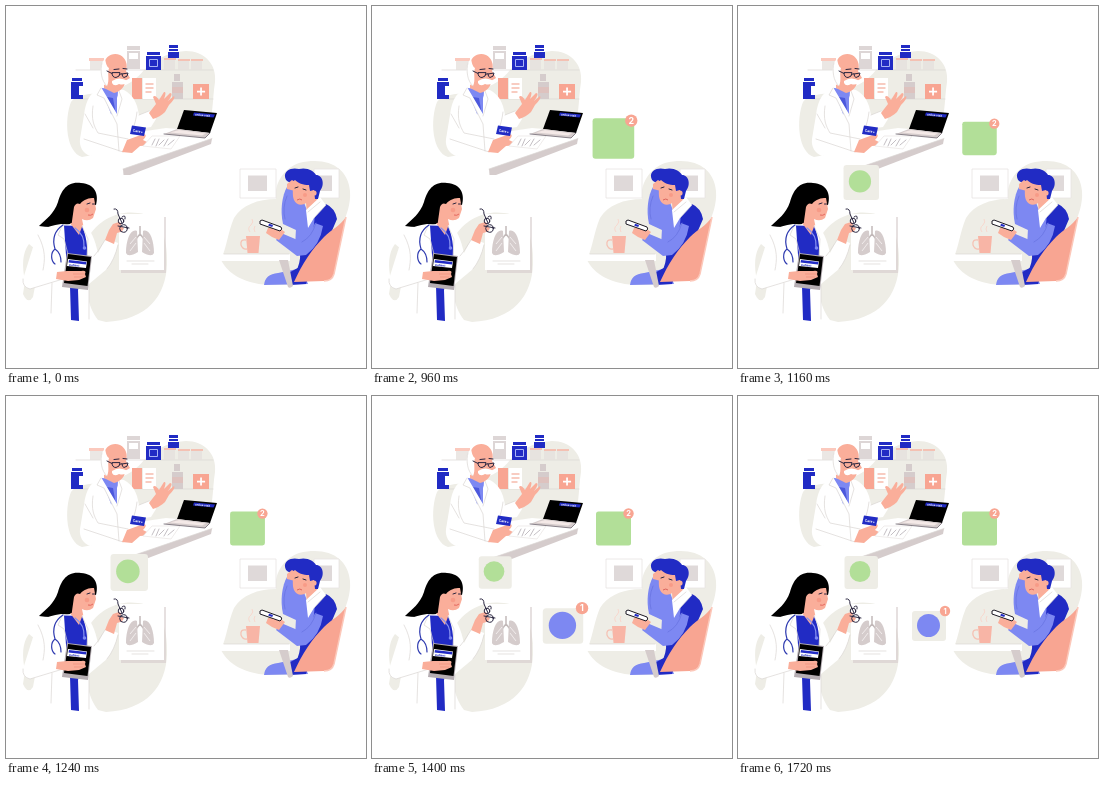
An HTML page for the animation above (3680 ms loop, 360 px wide and 362 px high).

```html
<!DOCTYPE html>
<html lang="en">
<head>
<meta charset="utf-8">
<title>Remote care</title>
<style>
html,body{margin:0;width:100%;height:100%;overflow:hidden;background:#fff}
svg{display:block;width:100%;height:100%}
text{font-family:Inter,Arial,sans-serif;font-weight:700}
.g{fill:#eeede6}.w{fill:#fff}.b{fill:#212bc4}.l{fill:#7d88f2}.s{fill:#faae9a}
.p{fill:#f8a592}.k{fill:#000}.d{fill:#d5cccc}.t{fill:#e6e2de}
.n{fill:none;stroke:#dad6d3;stroke-width:.7;stroke-linecap:round;stroke-linejoin:round}
.bs{fill:none;stroke:#2f3bb0;stroke-width:1.2;stroke-linecap:round}
.ks{fill:none;stroke:#2a2640;stroke-width:1;stroke-linecap:round}
</style>
</head>
<body>
<svg viewBox="0 0 360 362" preserveAspectRatio="none">

<!-- pharmacist -->
<g>
  <path class="g" d="M65 96C58 114 60 146 76 151L130 141L199 126C208 112 206 95 209 76C211 58 198 45 180 45C160 46 146 56 138 64C124 82 106 84 90 87C78 89 70 89 65 96Z"/>
  <path class="n" d="M70 64H207M74 93H207"/>
  <path class="t" d="M84 55h13v9H84zM103 55h14v9H103zM158 54h11v10H158zM172 55h11v9H172zM185 55h11v9H185z" opacity=".8"/>
  <path class="p" d="M83 52h15v3H83zM158 52h12v2H158zM172 53h12v2H172zM185 53h12v2H185z" opacity=".6"/>
  <path class="d" d="M121 40h13v4h-13zM121 45h13v18h-13z" opacity=".8"/>
  <path class="w" d="M123 47h9v6h-9z"/>
  <path class="b" d="M141 46h13v3H141zM140 50h15v14H140zM163 39h9v3h-9zM162 46h11v6H162zM163 43h9v2h-9z"/>
  <path d="M143.500 53.500h8v7h-8z" fill="none" stroke="#a8b3f4"/>
  <path class="b" d="M66 72h10v3H66zM65 76h12v17H65z"/>
  <path class="w" d="M73 80h4v9h-4z"/>
  <path class="p" d="M126 72h10v21h-10zM187 78h16v15h-16z"/>
  <path class="w" d="M137 72h13v21h-13zM194.200 81.500h1.700v3.200h3.200v1.700h-3.200v3.200h-1.700v-3.200H191v-1.700h3.200z"/>
  <path d="M139.500 78h8M139.500 82h8M139.500 86h6" stroke="#f6bcad" stroke-width="1.300"/>
  <path class="d" d="M168 68h6v7h-6zM166 76h11v17h-11z"/>
  <path class="p" d="M166 81h11v6h-11z" opacity=".25"/>

  <path class="w" d="M86 151L133 126L160 122L207 126L204 134L118 163Z"/>
  <path class="d" d="M117 163L206 132.500L205 138L124 169L117.500 169Z"/>
  <path class="n" d="M117 163L206 132.500" stroke="#b8b1b2"/>

  <path class="w" d="M98 81C86 84 80 92 78 109L74 133C73 141 77 147 84 150L119 147L134 137L131 123L145 121L150 113L143 105L133 109C131 96 127 89 118 84Z"/>
  <path class="l" d="M95 82L112 83L111 110L105 108Z"/>
  <path d="M101 91L107 92L110 109L104 102Z" fill="#4c58dc"/>
  <path class="w" d="M95 81L90 89L98 92L110 117L112 110L116 92L114 84L111 92L111 108Z"/>
  <path class="n" d="M95 82L91 89L98 92L111 118L113 145M113 85L116 93L111 110M79 108L87 122M78 133L117 146M87 100C85 114 88 120 92 127L122 133M131 106C130 113 129 119 126 124M133 109L143 105"/>

  <path class="s" d="M98 60C98 50 107 46 114 49C120 52 122 59 120 65L124 72L119 75C119 82 113 86 108 87L98 82Z"/>
  <path class="w" d="M99 53C93 57 94 70 97 78L101 80C104 74 101 68 103 62C100 60 100 56 99 53Z"/>
  <path class="w" d="M106 75Q113 70 122 75Q119 80 113 78Q108 81 106 77Z"/>
  <path class="n" d="M96 57C94 64 95 75 101 80"/>
  <path class="ks" stroke-width=".9" d="M101 65L106 67.500M106 67Q106 71.500 110 71.500Q114 71 114 67ZM114 68.500Q115 67 116 68L122 67Q122 71 118 71.500Q116 71 116 68M108 63.500L113 63M117 62.500L121 63"/>

  <path class="s" d="M143 107L150 98L147 91Q149 88 153 94L158 86Q161 85 158 93L164 87Q168 87 162 95L168 90Q170 92 163 99L159 106Q154 111 147 113Z"/>
  <path class="s" d="M121 134L132 130L138 128Q142 129 137 134L141 136Q141 140 134 140L126 147L116 146Z"/>
  <path class="b" d="M126 119.500L140 121.500L138 130L124 128Z"/>
  <text transform="translate(126.500 125.500) rotate(10)" font-size="3.500" fill="#fff">Care+</text>

  <path class="w" d="M146 130L174 130L165 143L137 140Z" stroke="#e4e0dd" stroke-width=".6"/>
  <path class="n" style="stroke:#aaa3aa" d="M149 133L146 139M153 133L150 140M158 134L153 139M162 133L158 140M168 134L162 139"/>
  <path class="k" d="M178 104L211 107L204 127L171 123Z"/>
  <path class="d" d="M171 123L204 127L199 132L158 128Z"/>
  <path d="M173 124L200 127.500L196 129.500L164 126.500Z" fill="#f4e9e7"/>
  <path class="n" style="stroke:#5f5864" d="M158 128L199 132L204 127"/>
  <path class="b" d="M188 106.500L209 108.500L207.500 111.500L187 109.500Z"/>
  <text transform="translate(189 109.400) rotate(6)" font-size="2.800" fill="#fff">online visit</text>
</g>

<!-- physician with chart -->
<g>
  <path class="g" d="M82 232C92 214 112 204 132 207C153 209 162 230 161 258C160 290 141 314 100 316L92 314C86 306 83 298 82 290Z"/>
  <path class="g" d="M23 238C16 247 16 260 19 275L17 288Q22 299 27 291L35 248Z"/>
  <path class="d" d="M115 211H160V267H115Z" opacity=".6"/>
  <path class="w" d="M113 208H158V264H113Z"/>
  <path d="M134 220V230M134 228L130 233M134 228L138 233" fill="none" stroke="#c2b9b9" stroke-width="1.500"/>
  <path class="d" d="M131 225C125 222 120 233 120 247Q122 252 132 246ZM137 225C143 222 148 233 148 247Q146 252 136 246Z"/>
  <path d="M130 231L124 238M130 237L124 245M138 231L144 238M138 237L144 245" stroke="#f4f0f0" stroke-width=".9"/>
  <path class="n" d="M121 255H148M126 258H142"/>

  <path class="k" d="M75 177C60 175 55 186 52 196C48 208 40 213 33 220C45 222 57 221 67 217L80 200L90 199C93 188 89 178 75 177Z"/>
  <path class="s" d="M68 201Q70 196 74 198C78 193 83 192 88 192L90 203L87 212Q82 216 76 213L78 223L65 222Z"/>
  <path class="ks" d="M81 198L84 197M86.500 198L88.500 198" stroke-width=".8"/>
  <path d="M82 209Q85 210 87 208" fill="none" stroke="#e5675f" stroke-width="1"/>
  <circle cx="81" cy="204" r="2.300" fill="#f58d7c" opacity=".6"/>

  <path class="w" d="M55 218C39 220 31 225 28 238L17 273Q16 281 24 283L46 276L45 310L83 314L83 278L101 263C107 256 111 245 112 237L100 232L92 247C89 234 85 222 77 219Z"/>
  <path class="b" d="M58 219.500L76 220C80 229 82 240 81 253L72 284L73 315L65 314L64 280L60 249Z"/>
  <path class="s" d="M64 217L77 218L73 229Z"/>
  <path class="n" d="M56 220L52 229L58 233L62 248M76 220L82 233L81 250M32 229C40 244 39 254 37 264M17 273Q16 281 24 283L57 273M88 250L92 245L99 234M101 263C106 257 110 248 112 239M46 277L45 307M83 279L83 313"/>
  <path class="bs" d="M57 219C48 225 46 233 49 243M49 243C44 247 45 255 49 258M49 243Q55 247 55 256"/>
  <path class="bs" d="M69 222Q79 229 78 241" style="stroke:#8791ef"/>
  <circle cx="78.500" cy="242" r="1.800" class="l"/>

  <path d="M61 247L86 250L82 284L56 281Z" fill="#b5adb2"/>
  <path class="k" d="M62 248L85 251L81.500 280L58 277Z"/>
  <path class="w" d="M62 253L81 255.500L80 262L61 260Z"/>
  <path class="b" d="M63 254L80.500 256L80 258.500L62.500 256.500Z"/>
  <text transform="translate(63 259.700) rotate(6)" font-size="3" fill="#2731c1">patient</text>
  <path class="s" d="M51 266L61 265L75 265Q81 264 79 268L80 271L73 274L62 275L50 273Z"/>
  <path d="M67 268L79 268M68 271L77 271" fill="none" stroke="#e98c78" stroke-width=".6"/>

  <path class="s" d="M99 234L103 224L107 218L113 216Q117 217 114 220L118 222Q117 226 111 227L108 238Z"/>
  <path class="ks" d="M108 203Q112 202 112 208L116 217"/>
  <circle cx="115" cy="215" r="2.800" class="ks"/>
  <circle cx="117.500" cy="222.500" r="3.800" class="ks"/>
  <path class="ks" d="M112 220L123 222M116 211Q120 208 119 213"/>
</g>

<!-- patient with phone -->
<g>
  <path class="g" d="M270 193C268 176 279 162 293 157C322 150 342 162 344 185C346 210 327 232 323 250C319 275 290 280 268 279C239 279 222 268 215 254C221 240 222 226 228 212C236 199 252 193 270 193Z"/>
  <path class="w" d="M234 163H270V192H234ZM308 163H333V192H308Z" stroke="#e8e4e2" stroke-width=".8"/>
  <path class="d" d="M242 169.500H261V185H242ZM312 169.500H326V185H312Z" opacity=".75"/>

  <path class="l" d="M258 279Q259 268 272 267L296 262L302 278Z"/>
  <path class="b" d="M279 269L297 259L308 252L300 278L284 279Z"/>

  <path class="l" d="M281 181C276 190 274 204 277 218L290 224L302 207L292 181Z"/>
  <path class="l" d="M298 206L312 198L322 210L310 240L299 249L289 242L290 222Z"/>
  <path class="b" d="M309 208L320 198Q329 202 331 213L322 234L300 264L289 268Q295 256 294 247L306 238Z"/>
  <path class="s" d="M288 173C287 182 286 189 288 194C290 199 296 200 300 197L301 207L312 198L310 180Z"/>
  <path class="b" d="M279 171C278 164 286 161 293 163C301 161 308 165 310 169C317 169 319 179 314 185L312 193L309 193L308 184L304 185L303 179C297 179 292 177 289 174C284 178 280 176 279 171Z"/>
  <path class="s" d="M281 183L281 178L286 174L289 176L288 181L289 185Z"/>
  <circle cx="308" cy="187" r="2.600" class="s"/>
  <path class="ks" d="M289 182L292 181M297 183L300 184" stroke-width=".8"/>
  <path d="M291 194Q294 192 296 194" fill="none" stroke="#d95e58" stroke-width=".9"/>
  <circle cx="299" cy="189" r="2" fill="#f58d7c" opacity=".6"/>
  <path class="w" d="M300 204L314 191L320 199L308 212L302 222Z"/>
  <path class="n" d="M302 206L314 196M308 212L320 199"/>
  <path class="l" d="M309 217L317 220Q314 239 300 249L291 250L270 234L275 227L294 235Q304 232 309 217Z"/>
  <path class="n" style="stroke:#6671e0" d="M310 217Q306 231 296 236M281 190Q276 202 279 213"/>

  <path class="p" d="M340 211C334 220 326 223 318 231C306 243 296 258 288 276L318 275Q326 275 328 268Z"/>
  <path d="M340 211L328 268Q326 275 318 275" fill="none" stroke="#fcc8ba" stroke-width="1.500"/>

  <path class="s" d="M262 222L269 219L279 226L273 234L266 231L260 227Z"/>
  <path class="w" d="M256 214L275 221Q277 223 274 225L254 218Q253 214 256 214Z" stroke="#1b1824" stroke-width="1"/>
  <path class="b" d="M263 217.800l4 1.300l-.7 2l-4-1.300z"/>
  <path class="s" d="M262 223L267 223L270 226L265 228Z"/>

  <path class="w" d="M215 248H284V255H215Z"/>
  <path class="n" d="M218 248H283"/>
  <path class="d" d="M273 254H282L287 280Q284 283 282 281Z"/>
  <path d="M240 230H254L252.500 247H241.500Z" fill="#f8b5a6"/>
  <path d="M240 234Q234 233 235 239Q237 244 241 243" fill="none" stroke="#f5c2b4" stroke-width="1.300"/>
  <path d="M244 226Q241 222 245 219Q248 216 246 213M249 226Q247 223 249 220" fill="none" stroke="#f8d8ce" stroke-width="1"/>
</g>

<!-- notifications -->
<g id="chat" visibility="hidden">
  <rect id="tile" x="224" y="115.500" width="35" height="34" rx="2.500"/>
  <circle cx="256.500" cy="117.500" r="5.200" class="p"/>
  <text x="256.500" y="120.200" font-size="7.500" text-anchor="middle" fill="#fff">2</text>
</g>
<g id="talk" visibility="hidden">
  <rect x="106.500" y="160" width="33.500" height="33" rx="3" class="g"/>
  <circle cx="122" cy="175.500" r="10.500" fill="#b2df98"/>
</g>
<g id="call" visibility="hidden">
  <rect x="174" y="215" width="34" height="30" rx="3" class="g"/>
  <circle cx="190.500" cy="229.500" r="11.500" class="l"/>
  <circle cx="207" cy="215" r="5.200" class="p"/>
  <text x="207" y="217.700" font-size="7.500" text-anchor="middle" fill="#fff">1</text>
</g>
</svg>
<script>
const LOOP = 3680, STEP = 40;
const scale = [.5, .82, 1.06, 1.19, 1.12, 1.07, 1.03, 1, .985, .99, .995, 1];
const alpha = [.6, .85, 1];
const at = (list, i) => list[Math.min(i, list.length - 1)];
const $ = id => document.getElementById(id);
const pops = [
  { el: $('chat'), start: 840, x: 242, y: 132 },
  { el: $('talk'), start: 1080, x: 123, y: 176.5 },
  { el: $('call'), start: 1280, x: 191, y: 230 }
];
const tile = $('tile');

function draw(time) {
  const t = time % LOOP;
  for (const { el, start, x, y } of pops) {
    const i = Math.floor((t - start) / STEP);
    el.setAttribute('visibility', i < 0 ? 'hidden' : 'visible');
    if (i < 0) continue;
    el.setAttribute('transform', `translate(${x} ${y}) scale(${at(scale, i)}) translate(${-x} ${-y})`);
    el.setAttribute('opacity', at(alpha, i));
  }
  tile.setAttribute('fill', t < 840 + STEP ? '#bbb8ae' : '#b2df98');
}

const begin = performance.now();
function tick() {
  draw(performance.now() - begin);
  requestAnimationFrame(tick);
}
tick();
</script>
</body>
</html>
```
